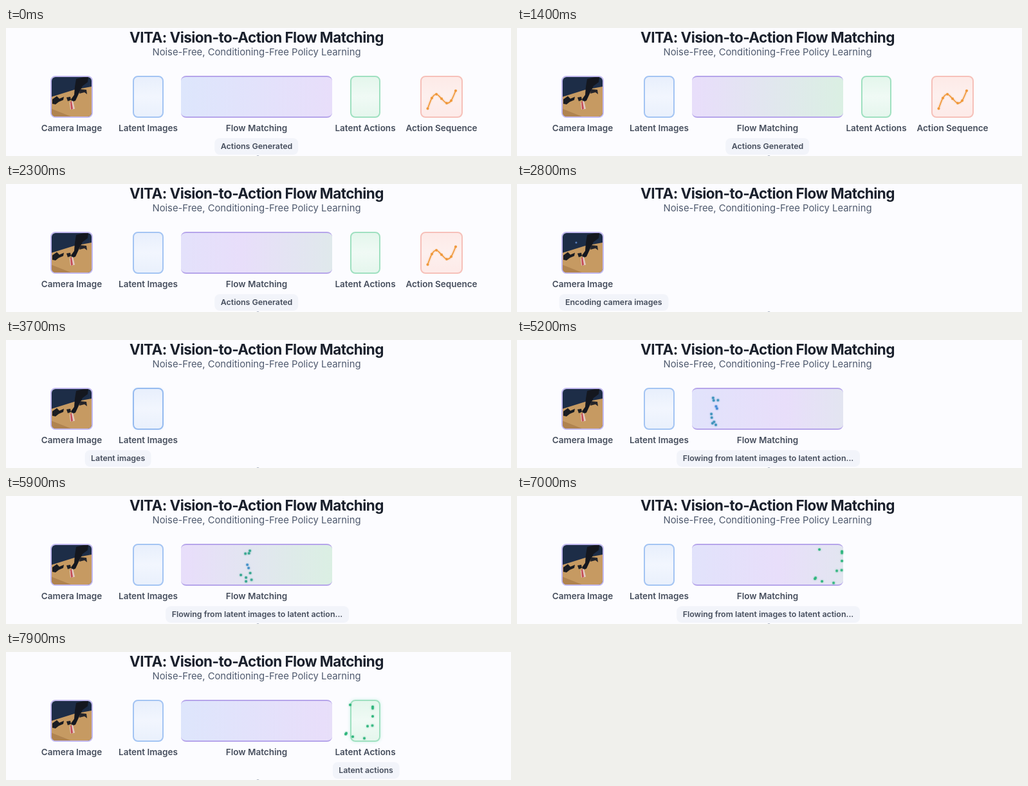
Write an HTML page that moves like this. It is 785x201 px and loops after 8 s.

```html
<!DOCTYPE html>
<html lang="en">
<head>
<meta charset="utf-8">
<title>Flow matching pipeline</title>
<style>
  html, body { margin: 0; width: 100%; height: 100%; overflow: hidden; background: #fcfcff; }
  body { position: relative; font-family: Inter, "Liberation Sans", sans-serif; color: #454d5c; }
  #stage { position: absolute; left: 0; top: 0; width: 785px; height: 201px; overflow: hidden; }
  #stage * { box-sizing: border-box; }

  h1, p { position: absolute; left: 0; width: 779px; margin: 0; text-align: center; white-space: nowrap; }
  h1 { top: 1px; font-size: 22.5px; line-height: 28px; font-weight: 700; letter-spacing: -.025em; color: #1a202c; }
  p { top: 28px; font-size: 14.8px; line-height: 20px; color: #4e596d; }

  /* Cards */
  .card { position: absolute; left: var(--x); top: 75px; width: var(--w); height: 92px; animation: 8s infinite both; }
  .box { position: relative; height: 66px; border: 2px solid var(--line); border-radius: 8px; overflow: hidden; }
  .card b { position: absolute; left: 50%; top: 72px; transform: translateX(-50%); white-space: nowrap;
    font-size: 13.5px; line-height: 20px; font-weight: 600; }
  svg { position: absolute; left: 0; top: 0; display: block; }

  #camera { --x: 69px; --w: 66px; --line: #c2b9f0; }
  #images { --x: 197px; --w: 48px; --line: #a3c4f3; animation-name: showImages; }
  #flow { --x: 272px; --w: 235px; --line: #b5a4ea; animation-name: showFlow; }
  #actions { --x: 535px; --w: 47px; --line: #9fe0c0; animation-name: showActions; }
  #sequence { --x: 644px; --w: 66px; --line: #f6c0b9; animation-name: showSequence; }

  #images .box { background: linear-gradient(#e8effc, #f2f6fe 50%, #e9f0fc); }
  #actions .box { background: linear-gradient(#e4f6ec, #f0faf5 50%, #e5f6ed); }
  #sequence .box { background: linear-gradient(#fdeae7, #fdf0ee 50%, #fdeae8); }
  #flow .box { border-width: 2px 0; background: linear-gradient(90deg, #dde6fc, #e8defa, #daf0e2) 0 0 / 200% 100%;
    animation: drift 8s infinite; }
  #images .box { animation: glowBlue 8s infinite; }
  #actions .box { animation: glowGreen 8s infinite; }
  #spark { animation: spark 8s infinite; }

  @keyframes showImages {
    0%, 31.69% { opacity: 1; transform: none; animation-timing-function: cubic-bezier(.215,.61,.355,1); }
    34.2%, 44.06% { opacity: 0; transform: scale(.87); animation-timing-function: cubic-bezier(.215,.61,.355,1); }
    46.56%, 100% { opacity: 1; transform: none; }
  }
  @keyframes showFlow {
    0%, 31.69% { opacity: 1; transform: none; animation-timing-function: cubic-bezier(.215,.61,.355,1); }
    34.2%, 56.5% { opacity: 0; transform: scale(.87); animation-timing-function: cubic-bezier(.215,.61,.355,1); }
    59%, 100% { opacity: 1; transform: none; }
  }
  @keyframes showActions {
    0%, 31.69% { opacity: 1; transform: none; animation-timing-function: cubic-bezier(.215,.61,.355,1); }
    34.2%, 89% { opacity: 0; transform: scale(.87); animation-timing-function: cubic-bezier(.215,.61,.355,1); }
    91.5%, 100% { opacity: 1; transform: none; }
  }
  @keyframes showSequence {
    0%, 31.69% { opacity: 1; transform: none; animation-timing-function: cubic-bezier(.215,.61,.355,1); }
    34.2%, 100% { opacity: 0; transform: scale(.87); }
  }
  @keyframes drift {
    0%, 40%, 56.5% { background-position: 0 0; animation-timing-function: cubic-bezier(.37,0,.63,1); }
    20%, 76.5% { background-position: 100% 0; animation-timing-function: cubic-bezier(.37,0,.63,1); }
    96.5% { background-position: 0 0; }
    100% { background-position: 6% 0; }
  }
  @keyframes glowBlue {
    0%, 44%, 60%, 100% { border-color: #a3c4f3; box-shadow: 0 0 0 #60a5fa00; }
    48%, 56.5% { border-color: #94baf0; box-shadow: 0 0 4px #60a5fa30; }
  }
  @keyframes glowGreen {
    0%, 89% { box-shadow: 0 0 0 #34d39900; }
    93%, 100% { box-shadow: 0 0 5px #34d39940; }
  }
  @keyframes spark {
    0%, 32% { opacity: 0; }
    35%, 42% { opacity: .75; }
    45%, 100% { opacity: 0; }
  }

  /* Status pill */
  #status { position: absolute; left: 0; top: 173px; width: 0; height: 26px; animation: ride 8s infinite; }
  #status span { position: absolute; left: 0; transform: translateX(-50%); padding: 0 9.5px; border-radius: 8px;
    background: #f2f4fa; white-space: nowrap; font-size: 12.4px; line-height: 26px; font-weight: 600;
    visibility: hidden; animation: 8s step-end infinite; }
  #status :nth-child(1) { animation-name: say1; }
  #status :nth-child(2) { animation-name: say2; }
  #status :nth-child(3) { animation-name: say3; }
  #status :nth-child(4) { animation-name: say4; }
  #status :nth-child(5) { animation-name: say5; }
  @keyframes ride {
    0%, 31.69% { transform: translateX(389.5px); animation-timing-function: ease; }
    37.94%, 44.06% { transform: translateX(102px); animation-timing-function: ease; }
    50.31%, 56.5% { transform: translateX(220.5px); animation-timing-function: ease; }
    62.75%, 89% { transform: translateX(390.5px); animation-timing-function: ease; }
    95.25%, 100% { transform: translateX(559.5px); }
  }
  @keyframes say1 { 0% { visibility: visible; } 31.69%, 100% { visibility: hidden; } }
  @keyframes say2 { 0% { visibility: hidden; } 31.69% { visibility: visible; } 44.06%, 100% { visibility: hidden; } }
  @keyframes say3 { 0% { visibility: hidden; } 44.06% { visibility: visible; } 56.5%, 100% { visibility: hidden; } }
  @keyframes say4 { 0% { visibility: hidden; } 56.5% { visibility: visible; } 89%, 100% { visibility: hidden; } }
  @keyframes say5 { 0% { visibility: hidden; } 89%, 100% { visibility: visible; } }
  #knob { position: absolute; left: 388.5px; top: 199.8px; width: 5px; height: 5px; border-radius: 50%; background: #a3abba; }

  /* Particles */
  .dot { position: absolute; left: -2.2px; top: -2.2px; width: 4.4px; height: 4.4px; border-radius: 50%;
    color: #3f80e0; background: currentColor; box-shadow: 0 0 3px -.5px currentColor; animation: travel 8s linear infinite; }
  @keyframes travel {
    0%, 46.25% { opacity: 0; transform: translate(calc(var(--x1) - 27px), var(--y1)); }
    50%, 56.5% { opacity: 1; transform: translate(calc(var(--x1) - 27px), var(--y1)); }
    57.5% { color: #3f80e0; transform: translate(var(--x1), var(--y1)); }
    73.75% { color: var(--mid); transform: translate(var(--x2), var(--y2)); }
    87.5% { color: #2fb57d; transform: translate(var(--x3), var(--y3)); animation-timing-function: cubic-bezier(.3,.45,.6,1); }
    98.75%, 100% { opacity: 1; color: #2fb57d; transform: translate(calc(var(--x3) + 65px), calc(var(--y3) - 1px)); }
  }
</style>
</head>
<body>
<div id="stage">
  <h1>VITA: Vision-to-Action Flow Matching</h1>
  <p>Noise-Free, Conditioning-Free Policy Learning</p>

  <div class="card" id="camera">
    <div class="box">
      <svg width="62" height="62" viewBox="0 0 62 62">
        <rect width="62" height="62" fill="#1d2d47"/>
        <path d="M0 31L35 20 62 15V62H0Z" fill="#c69a62"/>
        <path d="M0 50L30 62H0Z" fill="#b0834f"/>
        <path d="M38 3L50 0H57L56 8 48 14 43 24 37 37 32 39 30 35 35 28 36 15Z" fill="#14171f"/>
        <path d="M1 35L8 30 12 34 19 31 18 36 11 39 6 43 1 42Z" fill="#1a1c22"/>
        <path d="M23 32L29 31 30 36 25 38Z" fill="#1d1e24"/>
        <path d="M44 19L54 20 55 27 51 24 43 26Z" fill="#24242a"/>
        <path d="M28 40L33 37 36 50 29 51Z" fill="#e3cac2"/>
        <path d="M29 39L31 38 33 50 30 51Z" fill="#c44a54"/>
        <circle id="spark" cx="21" cy="15" r="1.5" fill="#6d9be6"/>
      </svg>
    </div>
    <b>Camera Image</b>
  </div>
  <div class="card" id="images"><div class="box"></div><b>Latent Images</b></div>
  <div class="card" id="flow"><div class="box"></div><b>Flow Matching</b></div>
  <div class="card" id="actions"><div class="box"></div><b>Latent Actions</b></div>
  <div class="card" id="sequence">
    <div class="box">
      <svg width="62" height="62" viewBox="646 77 62 62" fill="none" stroke="#f0983a" stroke-linecap="round">
        <path id="halo" stroke-width="5" opacity=".14"/>
        <path id="curve" stroke-width="1.7"/>
        <path id="knots" stroke-width="4"/>
      </svg>
    </div>
    <b>Action Sequence</b>
  </div>

  <div id="status">
    <span>Actions Generated</span>
    <span>Encoding camera images</span>
    <span>Latent images</span>
    <span>Flowing from latent images to latent action...</span>
    <span>Latent actions</span>
  </div>
  <div id="knob"></div>
</div>

<script>
  const stage = document.getElementById('stage');
  const setPath = (id, d) => document.getElementById(id).setAttribute('d', d);

  // Smooth curve through the action points
  const knots = [[655.5, 126.5], [662, 110], [669, 104], [677, 111], [685, 118], [692, 114], [699, 98.5]];
  const at = i => knots[Math.max(0, Math.min(knots.length - 1, i))];
  let d = 'M' + knots[0];
  for (let i = 0; i < knots.length - 1; i++) {
    const [a, b, c, e] = [at(i - 1), at(i), at(i + 1), at(i + 2)];
    const c1 = b.map((v, k) => v + (c[k] - a[k]) / 6);
    const c2 = c.map((v, k) => v - (e[k] - b[k]) / 6);
    d += `C${c1} ${c2} ${c}`;
  }
  setPath('halo', d);
  setPath('curve', d);
  setPath('knots', knots.map(p => `M${p}h.01`).join(''));

  // Particle waypoints: leaving the image latents, mid flow, end of flow
  const routes = [
    [241, 95, 379, 86, 470, 84],
    [261, 98, 372, 90.5, 505, 87],
    [244, 99, 377.5, 90, 505, 89.5],
    [253, 101, 375, 108, 505, 102],
    [254, 103, 377, 113, 504.5, 116.5],
    [235.5, 112, 379.5, 121, 497, 117.5],
    [249, 120, 365, 124, 464, 128.5],
    [249, 129, 373, 128, 463, 130],
    [237, 130, 381.5, 131.5, 474, 134],
    [254, 132.5, 373, 134, 492, 136.5]
  ];
  routes.forEach((route, i) => {
    const dot = document.createElement('i');
    dot.className = 'dot';
    route.forEach((v, k) => dot.style.setProperty('--' + 'xy'[k % 2] + (1 + (k >> 1)), v + 'px'));
    dot.style.setProperty('--mid', i === 3 || i === 4 ? '#4490c8' : '#33a58e');
    stage.append(dot);
  });
</script>
</body>
</html>
```
